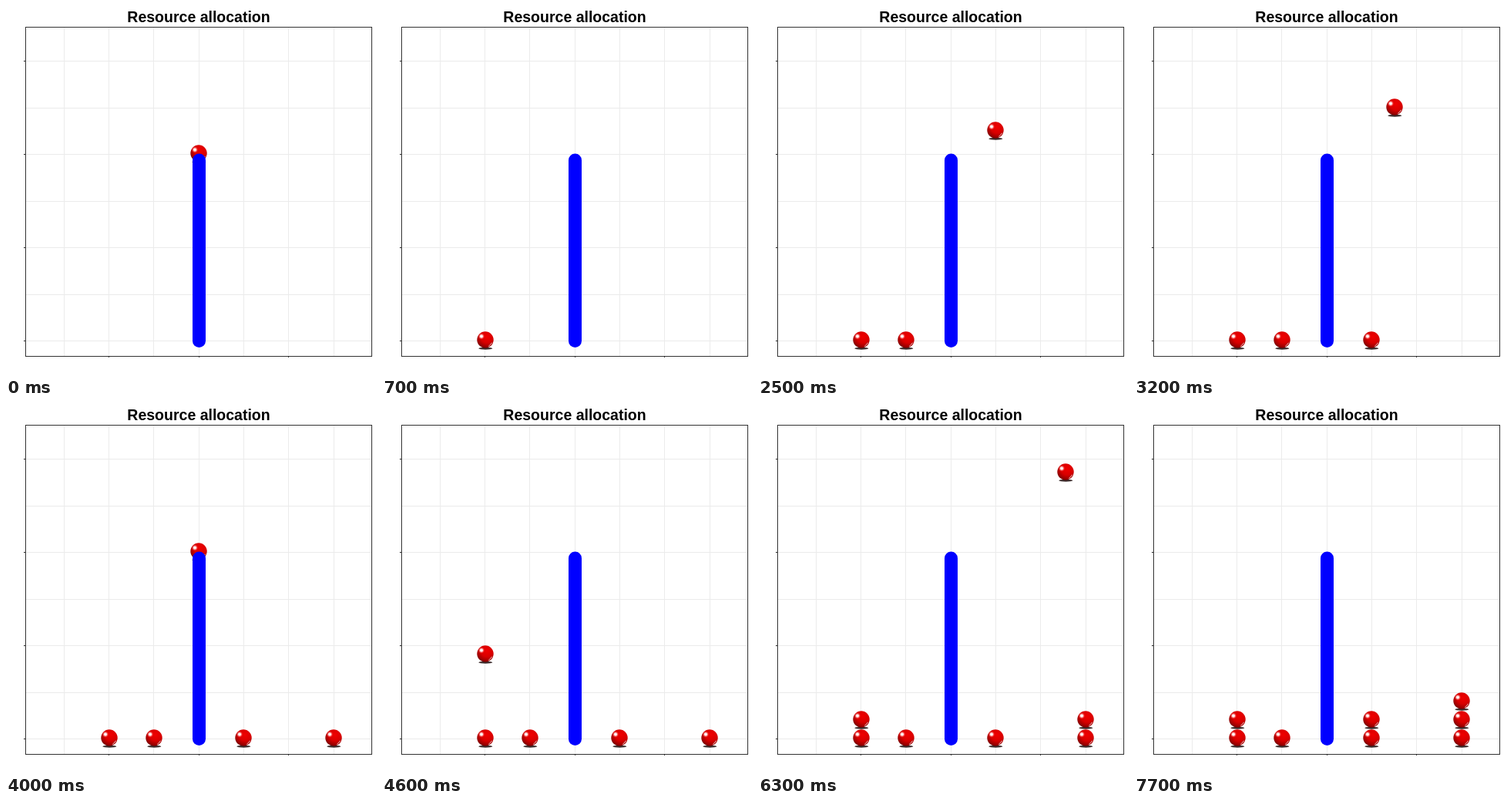
Write an HTML page with a canvas that moves like this. It is 480 px wide and 480 px high and loops after 8000 ms.

```html
<!DOCTYPE html>
<html lang="en">
<head>
<meta charset="utf-8">
<title>Resource allocation</title>
<style>
  html, body { margin: 0; width: 100%; height: 100%; overflow: hidden; background: #fff; }
  canvas { display: block; }
</style>
</head>
<body>
<canvas width="480" height="480"></canvas>
<script>
const ctx = document.querySelector('canvas').getContext('2d');
const LOOP = 8000, TURN = 1000, STEP = 100;
const columns = [-2, -1, 1, 3, -2, 3, 3, 1]; // landing column of each ball, in order
const START = 10, PEAK = 15, RISE_STEPS = 4, FALL_STEPS = 3;

const ease = p => (1 - Math.cos(Math.PI * p)) / 2;
const mix = (a, b, p) => a + (b - a) * p;

function rect(color, x, y, w, h) {
  ctx.fillStyle = color;
  ctx.fillRect(x, y, w, h);
}

function ellipse(fill, x, y, rx, ry, angle = 0) {
  ctx.fillStyle = fill;
  ctx.beginPath();
  ctx.ellipse(x, y, rx, ry, angle, 0, 2 * Math.PI);
  ctx.fill();
}

function gradient(x, y, r, ...stops) {
  const g = ctx.createRadialGradient(x, y, 0, x, y, r);
  stops.forEach(([at, color]) => g.addColorStop(at, color));
  return g;
}

function drawChart() {
  rect('#fff', 0, 0, 480, 480);
  for (let i = 0; i < 7; i++) {
    const x = Math.floor(75 + i * 175 / 3), y = Math.floor(71.5 + i * 60.5);
    rect('#ebebeb', x, 27, 1, 428);
    rect('#ebebeb', 25, y, 450, 1);
    if (i % 2) rect('#333', x, 455, 1, 1);
    else rect('#333', 23, y, 2, 1);
  }
  ctx.strokeStyle = '#333';
  ctx.lineWidth = 1;
  ctx.strokeRect(25.5, 27.5, 449, 427);
  ctx.fillStyle = '#000';
  ctx.font = 'bold 19.5px "Liberation Sans", Arial, sans-serif';
  ctx.textAlign = 'center';
  ctx.fillText('Resource allocation', 250, 21);
}

function drawBar() {
  ctx.strokeStyle = '#00f';
  ctx.lineWidth = 17;
  ctx.lineCap = 'round';
  ctx.beginPath();
  ctx.moveTo(250.5, 200);
  ctx.lineTo(250.5, 434.5);
  ctx.stroke();
}

function drawBall(column, height) {
  ctx.save();
  ctx.translate(Math.round(250.15 + 58.3 * column), Math.round(433.3 - 24.2 * height));
  ellipse('#3a2a2a', 0.3, 11.2, 9, 1.5);
  ellipse(gradient(2, -4, 16, [0, '#f00000'], [0.5, '#d80000'], [0.8, '#a00000'], [1, '#600000']),
    0, 0, 10.7, 10.7);
  ellipse(gradient(-5, -4.5, 4.5, [0, '#fff'], [0.35, '#ffe4e4'], [1, '#f000']), -5, -4.5, 4.5, 4.5);
  ctx.strokeStyle = '#f0c8c8';
  ctx.lineWidth = 1;
  ctx.beginPath();
  ctx.arc(0, 0, 9.3, 0.45, 1.05);
  ctx.stroke();
  ctx.restore();
}

function drawTurn(turn, step) {
  const column = columns[turn];
  const level = columns.slice(0, turn).filter(c => c === column).length;
  if (step <= RISE_STEPS) {
    const p = ease(step / RISE_STEPS);
    drawBall(column * p, mix(START, PEAK, p));
  } else {
    const p = ease(Math.min(1, (step - RISE_STEPS) / FALL_STEPS));
    drawBall(column, mix(PEAK, level, p));
  }
}

function frame(now) {
  const t = now % LOOP;
  const current = Math.floor(t / TURN), step = Math.floor(t % TURN / STEP);
  drawChart();
  for (let turn = 0; turn < current; turn++) drawTurn(turn, Infinity);
  // The last ball only appears once it is already rising.
  if (step || current < columns.length - 1) drawTurn(current, step);
  drawBar();
  requestAnimationFrame(frame);
}
requestAnimationFrame(frame);
</script>
</body>
</html>
```
